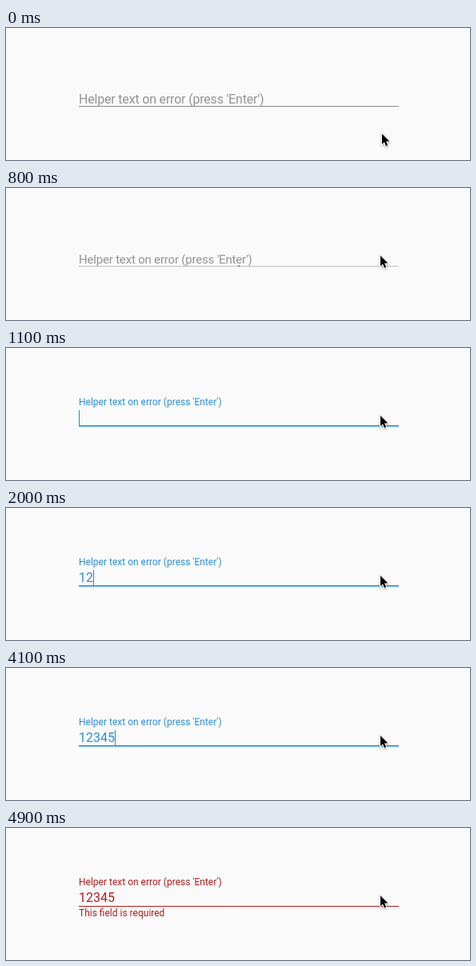
Animation of 580x166 px, one loop 7 s. Source, as an HTML page:

```html
<!DOCTYPE html>
<html lang="en">
<head>
<meta charset="utf-8">
<title>Text field with error</title>
<style>
  html, body { margin: 0; width: 100%; height: 100%; overflow: hidden; background: #fafafa; }
  body > * { position: absolute; }
  .text { left: 91px; font: 16px/normal Roboto, sans-serif; white-space: pre; }
  #error { color: #b01c1c; }
  #line { left: 91px; top: 98px; width: 400px; height: 1px; }
  #bar { left: 91px; top: 97px; width: 400px; height: 2px; }
  #caret { top: 78px; width: 1px; height: 19px; background: #2f86b8; }
  #pointer { left: 462px; top: 0; filter: drop-shadow(0 1px 1px rgba(0, 0, 0, .35)); }
</style>
</head>
<body>
<div id="line"></div>
<div id="bar"></div>
<div id="label" class="text">Helper text on error (press 'Enter')</div>
<div id="value" class="text"></div>
<div id="error" class="text">This field is required</div>
<div id="caret"></div>
<svg id="pointer" width="24" height="30" viewBox="-6 -6 24 30">
  <path d="M0 0V13.3L3 10.5L5 15.4L7.2 14.4L5.2 9.6H9.4Z" stroke="#fff" stroke-width="2" paint-order="stroke"/>
</svg>
<script>
const LOOP = 7000, STEP = 100;
const FOCUS = 783, BLUR = 4583, TRANSITION = 320;
const LEFT = 91, DIGIT_WIDTH = 9;
const KEY_TIMES = [1700, 2000, 2400, 2800, 3000];
const CARET_ON = [[900, 1400], [1700, 3600], [4100, 4600]];
const GREY = [148, 148, 148], BLUE = [48, 139, 218], BAR_BLUE = [74, 160, 216], RED = [176, 28, 28];

const [line, bar, label, value, error, caret, pointer] =
  ['line', 'bar', 'label', 'value', 'error', 'caret', 'pointer'].map(id => document.getElementById(id));

const clamp = x => Math.min(1, Math.max(0, x));
const lerp = (a, b, p) => a + (b - a) * p;
const mix = (a, b, p) => `rgb(${a.map((c, i) => Math.round(lerp(c, b[i], p)))})`;

// cubic-bezier(.4, 0, .2, 1), solved by bisection
function ease(x) {
  if (x <= 0 || x >= 1) return clamp(x);
  let low = 0, high = 1, s;
  for (let i = 0; i < 20; i++) {
    s = (low + high) / 2;
    const at = 1.2 * s * (1 - s) ** 2 + 0.6 * s * s * (1 - s) + s ** 3;
    if (at < x) low = s; else high = s;
  }
  return s * s * (3 - 2 * s);
}

function placeText(element, baseline, size) {
  element.style.fontSize = size + 'px';
  element.style.top = Math.round(baseline) - Math.round(size * 0.9277) + 'px';
}

function draw(t) {
  const focus = ease((t - FOCUS) / TRANSITION);
  const blur = ease((t - BLUR) / TRANSITION);
  const failed = t >= BLUR;
  const typed = KEY_TIMES.filter(time => t >= time).length;

  const labelSize = Math.floor(lerp(16, 12, focus) + 0.01);
  placeText(label, lerp(95, 72, focus), labelSize);
  label.style.letterSpacing = labelSize > 12 ? '-0.19px' : 'normal';
  label.style.color = failed ? mix(BLUE, RED, blur) : mix(GREY, BLUE, focus);

  value.textContent = '12345'.slice(0, typed);
  value.style.color = mix(BLUE, RED, blur);
  error.style.visibility = failed ? 'visible' : 'hidden';

  line.style.background = failed ? mix(RED, RED, 0) : focus > 0 ? '#c0c0c0' : '#8c8c8c';
  bar.style.background = mix(GREY, BAR_BLUE, focus);
  bar.style.transform = `scaleX(${focus * (1 - blur)})`;

  caret.style.left = LEFT + typed * DIGIT_WIDTH + 'px';
  caret.style.visibility = CARET_ON.some(([on, off]) => t >= on && t < off) ? 'visible' : 'hidden';

  const rise = 1 - (1 - clamp(t / 500)) ** 1.35;
  const x = Math.round(lerp(2, 0, clamp(t / 300)));
  const y = Math.round(lerp(133, 85, rise)) - 6;
  pointer.style.transform = `translate(${x}px, ${y}px)`;
}

placeText(value, 93, 16);
placeText(error, 111, 12);

const start = performance.now();
function tick() {
  const t = (performance.now() - start) % LOOP;
  draw(Math.floor(t / STEP) * STEP);
  requestAnimationFrame(tick);
}
draw(0);
requestAnimationFrame(tick);
</script>
</body>
</html>
```
